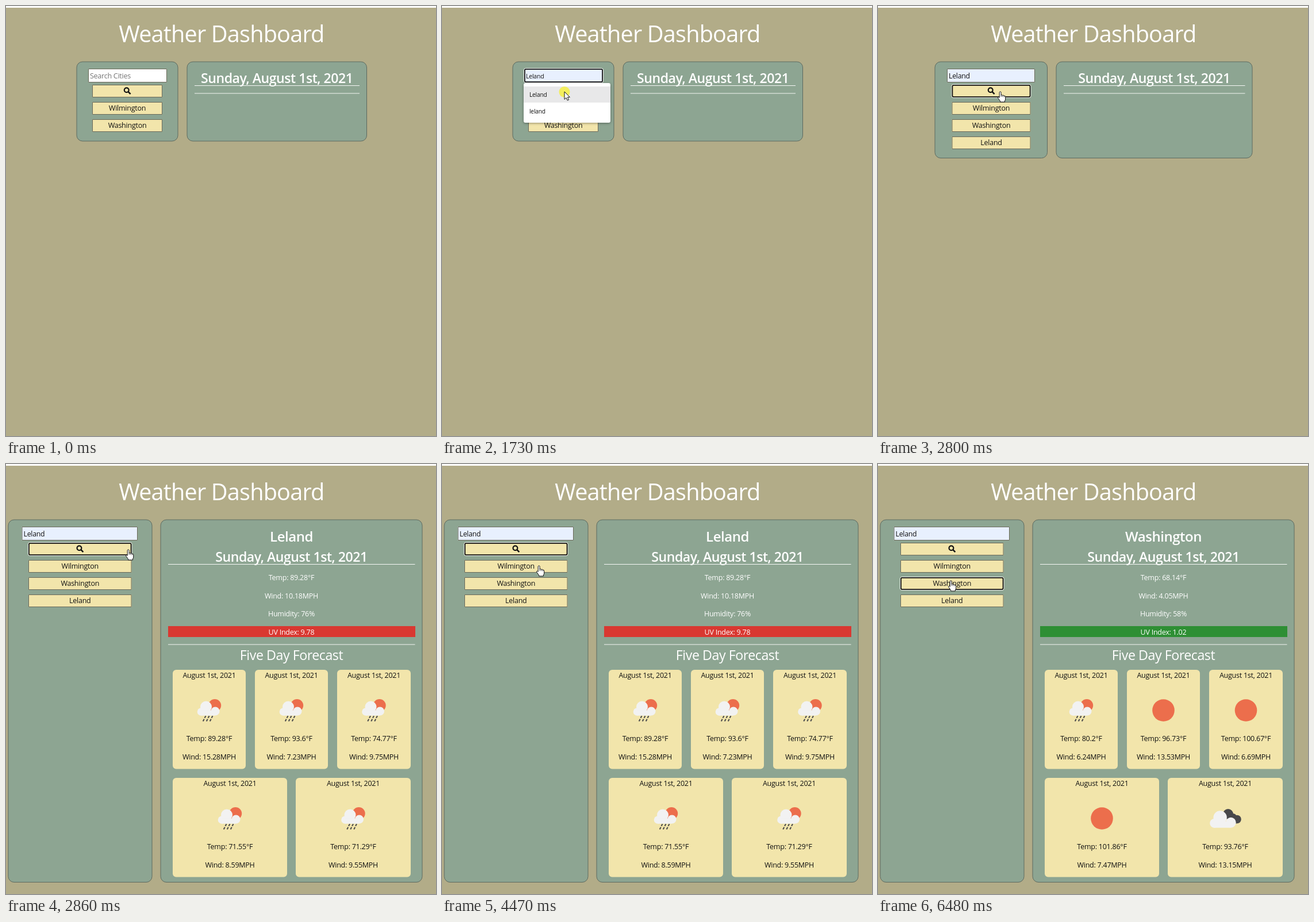
An HTML page with a canvas that plays this animation: 748 px wide and 748 px high, repeating every 8.29 s.

```html
<!DOCTYPE html>
<html lang="en">
<head>
<meta charset="utf-8">
<title>Weather Dashboard</title>
<style>
  html, body { margin: 0; width: 100%; height: 100%; overflow: hidden; background: #b2ac88; }
  canvas { display: block; width: 748px; height: 748px; }
</style>
</head>
<body>
<canvas id="stage" width="748" height="748"></canvas>
<script>
const ctx = document.getElementById('stage').getContext('2d');
const LOOP = 8290;
const STEP = 67;
const CREAM = '#f2e5ab', SUN = '#ec6e4c', CLOUD = '#f2f2f2', SLATE = '#48484a';

// Moments of the session, in ms
const T = { focus: 1200, list: 1270, hover: 1500, pick: 1730, picked: 1930, listGone: 2130,
  caretOff: 2460, search: 2660, added: 2800, loaded: 2860, city: 5540, cityUp: 5740,
  update: 6080, lastCard: 6480 };

const layouts = {
  start: { left: [123, 176], right: [315, 312.5], height: 138, input: [143, 137], button: [150, 122] },
  added: { left: [99, 195.5], right: [310, 341], height: 167.5, input: [120, 153], button: [128.5, 137] },
  full: { left: [4, 250], right: [269, 455], height: 630.5, input: [27.5, 201.5], button: [39, 179.5] }
};

const reports = {
  Leland: {
    now: ['Temp: 89.28°F', 'Wind: 10.18MPH', 'Humidity: 76%', 'UV Index: 9.78'], uv: '#d93831',
    days: [['rain', '89.28', '15.28'], ['rain', '93.6', '7.23'], ['rain', '74.77', '9.75'],
      ['rain', '71.55', '8.59'], ['rain', '71.29', '9.55']]
  },
  Washington: {
    now: ['Temp: 68.14°F', 'Wind: 4.05MPH', 'Humidity: 58%', 'UV Index: 1.02'], uv: '#2e8f34',
    days: [['rain', '80.2', '6.24'], ['sun', '96.73', '13.53'], ['sun', '100.67', '6.69'],
      ['sun', '101.86', '7.47'], ['clouds', '93.76', '13.15']]
  }
};

const cards = [[290, 358, 127], [433, 358, 127], [576, 358, 128], [290, 546, 199], [504, 546, 200]];

// Pointer stops: time, x, y
const route = [[460, 366, 736], [930, 213, 121], [1330, 213, 121], [1600, 213, 149],
  [3200, 213, 149], [3200, 212, 149], [3670, 212, 149], [4000, 204, 186], [4140, 204, 186],
  [4470, 169, 177], [4810, 127, 203]];

const arrowPath = new Path2D('M0 0V13.4L3.1 10.6 5.2 15.2 7.5 14.2 5.4 9.7H9.4Z');
const handPath = new Path2D('M-1.8 1.3Q-1.6 0 -.3 0Q1 0 1.1 1.3V6Q3.3 4.9 3.8 6.5Q5.8 5.6 6.3 7.3' +
  'Q8.6 6.8 8.7 9V13Q8.6 15 7.4 16V18H-.4V16.4L-4.2 11.2Q-4.9 9.8 -3.8 9.2Q-2.8 8.9 -1.8 10.4Z');

function text(str, x, y, size = 12.5, color = '#111', align = 'center', weight = 400) {
  ctx.font = `${weight} ${size}px "Open Sans", "Noto Sans", sans-serif`;
  ctx.letterSpacing = `${-0.02 * size}px`;
  ctx.textAlign = align;
  ctx.fillStyle = color;
  ctx.fillText(str, x, y);
}

function rect(x, y, w, h, color) {
  ctx.fillStyle = color;
  ctx.fillRect(x, y, w, h);
}

function round(x, y, w, h, r, fill, stroke, width = 1) {
  ctx.beginPath();
  ctx.roundRect(x, y, w, h, r);
  if (fill) { ctx.fillStyle = fill; ctx.fill(); }
  if (stroke) { ctx.strokeStyle = stroke; ctx.lineWidth = width; ctx.stroke(); }
}

function disc(x, y, r, color) {
  ctx.fillStyle = color;
  ctx.beginPath();
  ctx.arc(x, y, r, 0, Math.PI * 2);
  ctx.fill();
}

function line(x1, y1, x2, y2, color, width = 1) {
  ctx.strokeStyle = color;
  ctx.lineWidth = width;
  ctx.beginPath();
  ctx.moveTo(x1, y1);
  ctx.lineTo(x2, y2);
  ctx.stroke();
}

function panel([x, w], h) {
  round(x, 97, w, h, 10, '#8da592', '#5d6a60');
}

function focusRing(x, y, w, h) {
  round(x - 0.5, y - 0.5, w + 1, h + 1, 3, null, 'rgba(255,255,255,.85)');
  round(x + 0.9, y + 0.9, w - 1.8, h - 1.8, 2, null, '#101010', 1.8);
}

function box(x, y, w, h, fill, focused) {
  rect(x, y, w, h, fill);
  if (focused) focusRing(x, y, w, h);
  else round(x + 0.5, y + 0.5, w - 1, h - 1, 0, null, '#6b6a5a');
}

function cloud(x, y, s, color) {
  disc(x - 4.5 * s, y - 6 * s, 10 * s, color);
  disc(x - 13 * s, y + 2.5 * s, 6.8 * s, color);
  disc(x + 11.5 * s, y + 1.5 * s, 7.6 * s, color);
  rect(x - 13 * s, y, 24 * s, 9.2 * s, color);
}

const icons = {
  sun(x, y) { disc(x, y, 19.3, SUN); },
  rain(x, y) {
    disc(x + 9.7, y - 8.5, 11, SUN);
    cloud(x - 1, y, 1, CLOUD);
    for (let i = 0; i < 6; i++) {
      const row = Math.floor(i / 3);
      const dx = x - 7 + (i % 3) * 6 - row * 2.8, dy = y + 11.5 + row * 5.6;
      line(dx + 1, dy - 1.8, dx - 1, dy + 1.8, SLATE, 2);
    }
  },
  clouds(x, y) {
    disc(x + 5, y - 7.5, 9, SLATE);
    disc(x + 20.5, y + 1.5, 7.3, SLATE);
    disc(x + 14, y - 3, 5.5, SLATE);
    rect(x + 5, y - 3, 15.5, 11.8, SLATE);
    cloud(x - 3.6, y + 5.5, 1.17, CLOUD);
  }
};

function magnifier(x) {
  ctx.strokeStyle = '#111';
  ctx.lineWidth = 2.2;
  ctx.beginPath();
  ctx.arc(x - 1.3, 146.3, 3.9, 0, Math.PI * 2);
  ctx.stroke();
  line(x + 1.6, 149.2, x + 5.6, 153.2, '#111', 2.6);
}

function drawSidebar(t, layout) {
  panel(layout.left, layout.height);
  const [ix, iw] = layout.input, [bx, bw] = layout.button;
  const filled = t >= T.hover, typing = t >= T.focus && t < T.search;
  box(ix, 109, iw, 24, filled ? '#e8f0fe' : '#fff', typing);
  if (!filled) text('Search Cities', ix + 3, 126, 12.5, '#757575', 'left');
  else text('Leland', ix + 3, 126, t < T.picked ? 10.5 : 12.3, '#111', 'left');
  if (t >= T.picked && t < T.caretOff) rect(182, 112, 1, 17, '#111');

  const names = ['', 'Wilmington', 'Washington'];
  if (t >= T.added) names.push('Leland');
  const active = t >= T.city ? 2 : t >= T.search ? 0 : -1;
  names.forEach((name, i) => {
    const y = 137 + i * 30;
    box(bx, y, bw, 22, CREAM, i === active);
    if (i) text(name, bx + bw / 2, y + 15);
    else magnifier(bx + bw / 2);
  });
}

function drawSuggestions(t) {
  if (t < T.list || t >= T.listGone) return;
  ctx.save();
  if (t >= T.picked) ctx.globalAlpha = 1 - (Math.floor((t - T.picked) / STEP) + 1) / 4;
  ctx.shadowColor = 'rgba(0,0,0,.4)';
  ctx.shadowBlur = 4;
  ctx.shadowOffsetY = 1;
  round(142, 134, 151, 69, 3, '#fff');
  ctx.shadowColor = 'transparent';
  if (t >= T.hover) rect(142, 140, 151, 28, '#e8e8e9');
  text('Leland', 152, 158, 10.2, '#111', 'left');
  text('leland', 152, 186.5, 10.2, '#111', 'left');
  ctx.restore();
}

function drawCard([x, y, w], [icon, temp, wind], ready) {
  const mid = x + w / 2;
  round(x, y, w, 172.5, 6, CREAM);
  text('August 1st, 2021', mid, y + 14);
  if (!ready) return;
  icons[icon](mid, y + 70.5);
  text(`Temp: ${temp}°F`, mid, y + 124);
  text(`Wind: ${wind}MPH`, mid, y + 155.5);
}

function drawReport(t, layout) {
  const [x, w] = layout.right, mid = x + w / 2, loaded = t >= T.loaded;
  const rule = y => rect(x + 13, y, w - 25.5, 1, '#f4f6f4');
  panel(layout.right, layout.height);
  text('Sunday, August 1st, 2021', mid, loaded ? 169.5 : 133.5, 23.1, '#fff', 'center', 600);
  rule(loaded ? 174 : 138);
  rule(loaded ? 313.5 : 151.5);
  if (!loaded) return;

  const city = t < T.update ? 'Leland' : 'Washington', report = reports[city];
  text(city, mid, 135, 24, '#fff', 'center', 600);
  rect(x + 13, 282, w - 25, 19, report.uv);
  report.now.forEach((row, i) => text(row, mid, 202 + i * 31.5, 12.5, '#fff'));
  text('Five Day Forecast', mid, 341, 23.2, '#fff');
  cards.forEach((card, i) => {
    const ready = i < 4 || t < T.update || t >= T.lastCard;
    drawCard(card, report.days[i], ready);
  });
}

function pointerAt(t) {
  let i = route.length - 1;
  while (i > 0 && route[i][0] > t) i--;
  const [t0, x0, y0] = route[i], [t1, x1, y1] = route[i + 1] || [LOOP, x0, y0];
  const u = Math.floor((t - t0) / STEP) * STEP / (t1 - t0);
  const e = u * (2 - u);
  return [x0 + (x1 - x0) * e, y0 + (y1 - y0) * e];
}

function pointerKind(t, x, y, { input, button }) {
  const over = ([bx, bw], top, h) => x >= bx && x <= bx + bw && y >= top && y <= top + h;
  if (over(input, 109, 24)) return 'beam';
  if (t >= T.list && t < T.picked) return 'arrow';
  const onButton = [0, 1, 2].some(i => over(button, 137 + i * 30, 22));
  return onButton ? 'hand' : 'arrow';
}

function drawPointer(t, layout) {
  if (t < route[0][0]) return;
  const [x, y] = pointerAt(t);
  const clicks = [[T.focus, 1400], [T.pick, T.picked], [T.search, T.added], [T.city, T.cityUp]];
  if (clicks.some(([from, to]) => t >= from && t < to)) disc(x, y + 0.5, 9.5, 'rgba(246,239,50,.76)');

  const kind = pointerKind(t, x, y, layout);
  ctx.save();
  ctx.translate(x, y);
  if (kind === 'beam') {
    line(0, -7, 0, 7, '#111');
    line(-3, -7.5, 3, -7.5, '#111');
    line(-3, 7.5, 3, 7.5, '#111');
  } else {
    const path = kind === 'hand' ? handPath : arrowPath;
    ctx.fillStyle = '#fff';
    ctx.strokeStyle = '#111';
    ctx.lineWidth = 1;
    ctx.lineJoin = 'round';
    ctx.fill(path);
    ctx.stroke(path);
    if (kind === 'hand') {
      line(1.2, 6, 1.2, 9, '#111', 0.8);
      line(3.8, 6.5, 3.8, 9.2, '#111', 0.8);
      line(6.3, 7.3, 6.3, 9.5, '#111', 0.8);
    }
  }
  ctx.restore();
}

function draw(t) {
  const layout = t < T.added ? layouts.start : t < T.loaded ? layouts.added : layouts.full;
  rect(0, 0, 748, 748, '#b2ac88');
  rect(0, 0, 748, 3, '#fff');
  text('Weather Dashboard', 374.8, 63, 39.6, '#fff');
  drawSidebar(t, layout);
  drawReport(t, layout);
  drawSuggestions(t);
  drawPointer(t, layout);
}

const start = performance.now();
function tick() {
  draw((performance.now() - start) % LOOP);
  requestAnimationFrame(tick);
}
tick();
</script>
</body>
</html>
```
